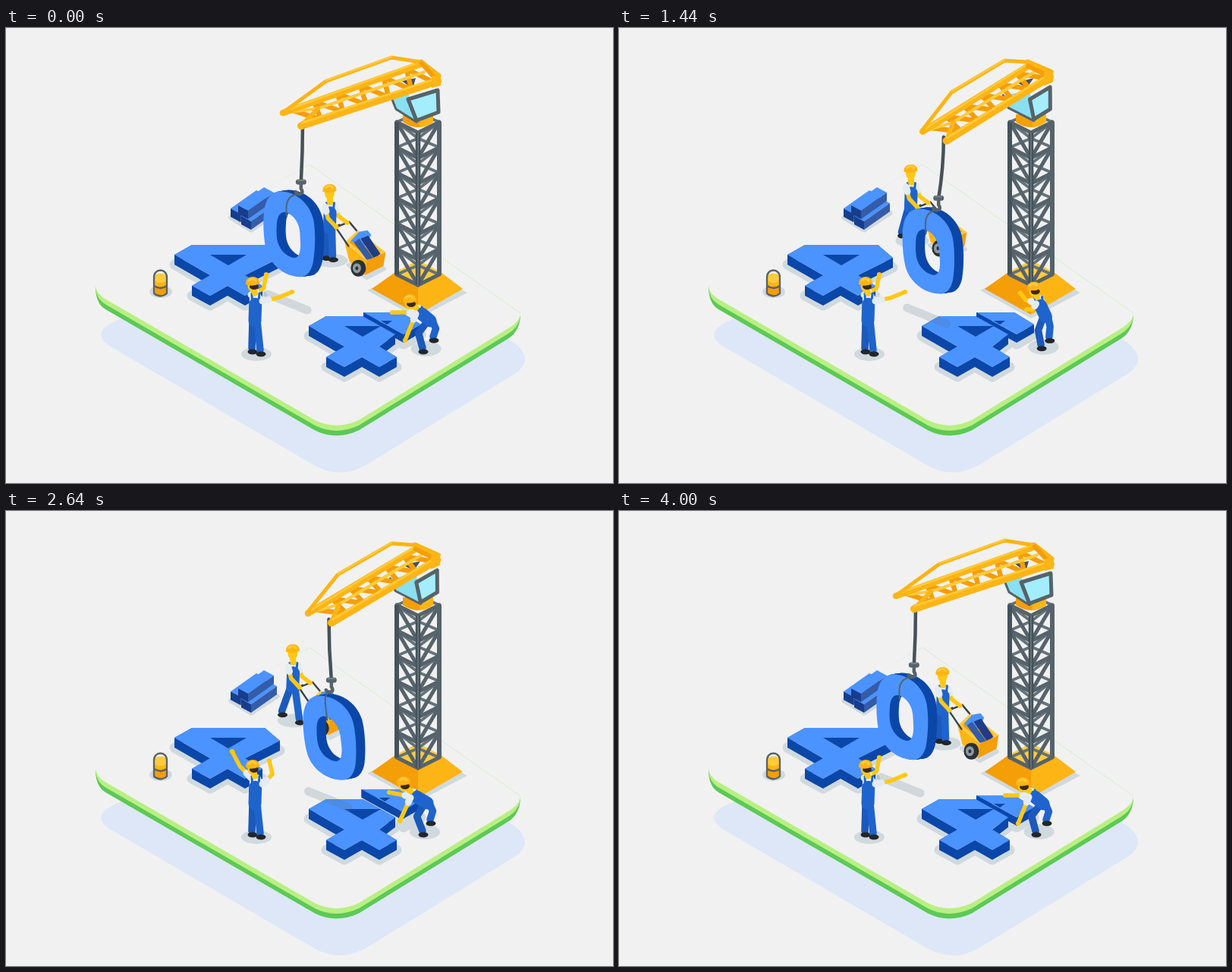
An HTML page for the animation above (4.04 s loop, 800x600 px).

```html
<!DOCTYPE html>
<html lang="en">
<head>
<meta charset="utf-8">
<title>Construction site</title>
<style>
html, body { margin: 0; width: 100%; height: 100%; overflow: hidden; background: #f1f1f1; }
svg { display: block; width: 100vw; height: 100vh; }
</style>
</head>
<body>
<svg id="stage" viewBox="0 0 800 600" stroke-linejoin="round" stroke-linecap="round"></svg>
<script>
const LOOP = 4040, CYCLE = 4000, TURN = 2 * Math.PI / CYCLE;
const BLUE = '#4b93ff', NAVY = '#0b47a8', DENIM = '#1f64cc', SKIN = '#ffc814', GOLD = '#fdb515',
  AMBER = '#f49e08', SUN = '#ffcb3c', STEEL = '#56636b', DARK = '#45525a', SHADE = '#d0d9de', PAPER = '#f1f1f1';

const lerp = (a, b, k) => a + (b - a) * k;
const mix = (p, q, k) => [lerp(p[0], q[0], k), lerp(p[1], q[1], k)];
const add = (p, q) => [p[0] + q[0], p[1] + q[1]];

// There and back once per cycle; lag makes hanging or pushed things trail the crane.
const swing = (t, lag = 0) => (1 - Math.cos((t - lag) * TURN)) / 2;
function ramp(t, from, to) {
  const u = Math.min(1, Math.max(0, (t - from) / (to - from)));
  return u * u * (3 - 2 * u);
}

// Elbow or knee: the middle of a limb pushed sideways.
function joint(a, b, bend) {
  const dx = b[0] - a[0], dy = b[1] - a[1], len = Math.hypot(dx, dy) || 1;
  return add(mix(a, b, .5), [-dy / len * bend, dx / len * bend]);
}

const poly = (pts, fill, extra = '') => `<polygon points="${pts.map(p => p.join()).join(' ')}" fill="${fill}" ${extra}/>`;
const line = (pts, color, w, extra = '') =>
  `<polyline points="${pts.map(p => p.join()).join(' ')}" fill="none" stroke="${color}" stroke-width="${w}" ${extra}/>`;
const path = (d, fill, extra = '') => `<path d="${d}" fill="${fill}" ${extra}/>`;
const curve = (d, color, w) => path(d, 'none', `stroke="${color}" stroke-width="${w}"`);
const oval = ([x, y], rx, ry, fill) => `<ellipse cx="${x}" cy="${y}" rx="${rx}" ry="${ry}" fill="${fill}"/>`;
const group = (transform, body) => `<g transform="${transform}">${body}</g>`;

function slab(pts, depth) {
  const sides = pts.map((a, i) => {
    const b = pts[(i + 1) % pts.length];
    return poly([a, b, add(b, [0, depth]), add(a, [0, depth])], NAVY);
  });
  return sides.join('') + poly(pts, BLUE);
}
const slabShadow = pts => poly(pts.map(p => add(p, [0, 13])), SHADE, `stroke="${SHADE}" stroke-width="13"`);

function ground() {
  const plate = (drop, fill) => path(
    `M118 ${338 + drop / 4}Q118 ${350 + drop} 132 ${358 + drop}L407 ${517 + drop}Q435 ${531 + drop} 465 ${517 + drop}`
    + `L662 ${396 + drop}Q678 ${386 + drop} 678 376L400 180Z`, fill);
  return path('M150 384Q109 400 136 419L405 576Q440 596 475 576L672 455Q697 437 670 415L400 260Z', '#dde7f7')
    + plate(13.5, '#5cc956') + plate(7, '#b9ef83') + plate(0, PAPER);
}

// Shared outline of the digit 4 without its upper right arm.
const FOOT = [[492, 420], [515, 434], [492, 447], [469, 434], [446, 447], [422, 434], [446, 420], [399, 393], [422, 380]];
const CUT_FOUR = [[470, 380], [513, 404], ...FOOT];
const FOUR = [[518, 380], [538, 397], ...FOOT];
const HOLE = [[446, 393], [494, 393], [470, 407]];
const PIECE = [[471, 375], [521, 375], [547, 391], [524, 404]];

function planks() {
  const bar = (x, y) => group(`translate(${x} ${y})`,
    poly([[0, 0], [34, -24], [47, -17], [13, 7]], BLUE)
    + poly([[0, 0], [13, 7], [13, 18], [0, 11]], '#173d8c')
    + poly([[13, 7], [47, -17], [47, -6], [13, 18]], '#345ca9'));
  return poly([[297, 250], [323, 266], [357, 244], [325, 232]], SHADE, `stroke="${SHADE}" stroke-width="7"`)
    + bar(296, 238) + bar(310, 248) + bar(306, 234);
}

function bucket() {
  return oval([204, 348], 15, 8, SHADE)
    + path('M194 330L195 350Q204 357 212 350L213 330Z', AMBER)
    + oval([203.5, 330], 9.5, 6.5, SUN) + path('M194 331Q203 342 213 331V337Q203 345 194 337Z', GOLD)
    + curve('M195 340Q204 346 212 340M195 350Q204 357 212 350M195 350V330C194 316 213 316 212 330V350', STEEL, 2.3);
}

function craneTower() {
  const left = [515, 124], front = [543, 138], right = [571, 124], back = [543, 112], step = 33.5;
  const down = (p, i) => add(p, [0, i * step]);
  const lattice = (middle, color, w) => {
    let out = '';
    for (let i = 0; i <= 6; i++) {
      out += line([down(left, i), down(middle, i), down(right, i)], color, w);
      if (i < 6) out += line([down(left, i), down(middle, i + 1), down(right, i)], color, w);
    }
    return out;
  };
  const column = (p, color, w) => line([p, down(p, 6)], color, w, 'stroke-linecap="butt"');
  return poly([[476, 346], [543, 383], [608, 349], [540, 314]], SHADE)
    + poly([[482, 344], [513, 322], [543, 340], [543, 378]], AMBER)
    + poly([[602, 344], [573, 322], [543, 340], [543, 378]], GOLD)
    + poly([[513, 322], [543, 306], [573, 322], [543, 340]], SUN)
    + lattice(back, '#65737b', 4) + lattice(front, STEEL, 5)
    + column(left, DARK, 6) + column(right, STEEL, 6) + column(front, DARK, 6.5) + column(front, '#6d7a82', 1.5)
    + path('M523 114H563V124Q543 138 523 124Z', AMBER) + path('M545 114H563V124Q555 130 545 131Z', GOLD);
}

function craneArm(k) {
  const P = (ax, ay, bx, by) => [lerp(ax, bx, k), lerp(ay, by, k)];
  const side = [P(508, 92, 506, 88), P(530, 86, 544, 82), P(541, 124, 548, 122), P(514, 107, 513, 105)];
  const glass = [P(530, 94, 544, 94), P(569, 82, 568, 77), P(570, 111, 568, 106), P(541, 122, 548, 120)];
  const l0 = P(365, 112, 408, 142), l1 = P(548, 47, 537, 51);
  const f0 = P(389, 129, 441, 153), f1 = P(569, 70, 568, 63);
  const at = (u, v) => mix(mix(l0, l1, u), mix(f0, f1, u), v);
  const braces = Array.from({ length: 12 }, (_, i) => at(.06 + i * .083, i % 2));
  const rail = [P(367, 110, 407, 140), P(422, 70, 442, 88), P(508, 39, 508, 44), P(547, 45, 537, 45)];
  return poly(side, '#8adff1') + line([side[0], side[3], side[2]], STEEL, 3)
    + poly(glass, '#a3edfd', `stroke="${STEEL}" stroke-width="5"`)
    + poly([P(522, 70, 524, 72), P(540, 66, 548, 66), P(536, 80, 538, 78)], DARK)
    + line(braces, AMBER, 6.5)
    + line([at(.05, .1), at(.2, .4), at(.97, .4)], SUN, 4) + line([at(.2, .4), at(0, 1)], GOLD, 6)
    + line([l0, l1], GOLD, 8.5) + line([add(l0, [2, -3]), add(l1, [0, -3])], SUN, 2.5)
    + line(rail, GOLD, 5) + line(rail.slice(1, 3).map(p => add(p, [0, -1])), SUN, 2)
    + line([rail[3], P(570, 63, 569, 57)], GOLD, 7) + line([l1, f1], AMBER, 6)
    + line([f0, f1], GOLD, 10) + line([add(f0, [1, -4]), add(f1, [0, -4])], SUN, 2.5)
    + poly([P(561, 63, 560, 57), P(573, 62, 572, 55), P(573, 76, 572, 70), P(561, 79, 560, 76)], GOLD);
}

const RING = 'M392 280C392 262 398 250 411 248C434 247 452 263 458 283C462 300 463 322 461 340C459 352 453 359 445 359'
  + 'C425 360 405 346 398 326C394 312 392 295 392 280Z'
  + 'M410 291C410 280 414 275 420 275C432 278 439 288 441 300C443 315 444 322 442 329C440 335 436 335 432 334C422 331 415 323 412 313C410 304 410 298 410 291Z';

function zero(t, hook) {
  const x = lerp(335, 396, swing(t, 290)), y = lerp(327, 359, swing(t, 150));
  const tilt = lerp(4.5, 0, swing(t, 500));
  let body = '';
  for (let i = 8; i > 0; i--) body += group(`translate(${i * 1.5} ${-i * .3})`, path(RING, NAVY, 'fill-rule="evenodd"'));
  body += path(RING, BLUE, 'fill-rule="evenodd"');
  const [hx, hy] = hook, ex = x + 32, ey = y - 79;
  return group(`translate(${x - 392} ${y - 359}) rotate(${tilt} 432 303)`, body)
    + curve(`M${hx - 1} ${hy + 14}C${hx - 10} ${hy + 18} ${ex - 4} ${ey - 28} ${ex} ${ey}`, STEEL, 2);
}

function zeroShadow(t) {
  const x = lerp(342, 403, swing(t, 290)), y = lerp(351, 374, swing(t, 60));
  return line([[x, y], [x + 52, y + 21]], 'rgba(80,110,130,.2)', 11);
}

function rope(k, [hx, hy]) {
  const [x, y] = mix([391, 125], [436, 148], k);
  return curve(`M${x} ${y}Q${x} ${(y + hy) / 2} ${hx} ${hy}`, DARK, 4.5)
    + curve(`M${hx} ${hy + 2}V${hy + 9}Q${hx + 4} ${hy + 15} ${hx - 2} ${hy + 16}Q${hx - 6} ${hy + 16} ${hx - 7} ${hy + 13}`, STEEL, 4.5)
    + line([[hx - 3.5, hy], [hx + 3.5, hy]], STEEL, 7) + line([[hx - 4, hy - 2], [hx + 4, hy - 2]], '#75828a', 2);
}

function arm([shoulder, hand, bend]) {
  const elbow = joint(shoulder, hand, bend);
  return line([shoulder, elbow, hand], SKIN, 5.5) + line([shoulder, mix(shoulder, elbow, .4)], '#e4ebf2', 9)
    + oval(hand, 3.2, 2.8, SKIN);
}

function worker({ head, shoulder, hip, feet, bends = [0, 0], arms, hair = true }) {
  const [hx, hy] = head, chest = mix(shoulder, hip, .3);
  const leg = i => {
    const top = add(hip, [i ? 3 : -3, 0]), ankle = add(feet[i], [0, -5]);
    return line([top, joint(top, ankle, bends[i]), ankle], i ? DENIM : '#1b59bb', 9.5)
      + oval(add(feet[i], [1, 0]), 6.5, 3.4, '#22262b');
  };
  const strap = x => line([add(shoulder, [x, -5]), add(chest, [x * .8, 0])], DENIM, 3);
  return arm(arms[0]) + leg(0) + leg(1)
    + line([shoulder, chest], '#e9eff5', 16) + line([chest, hip], DENIM, 17) + strap(-5) + strap(5)
    + line([[hx, hy + 6], mix(head, shoulder, .75)], SKIN, 8)
    + oval([hx, hy + 6], 6.5, 8, SKIN)
    + (hair ? oval([hx + 2, hy + 7], 6, 4, '#3a2a1c') : '')
    + path(`M${hx - 9} ${hy + 4}C${hx - 10} ${hy - 9} ${hx + 10} ${hy - 9} ${hx + 9} ${hy + 3}Q${hx} ${hy + 8} ${hx - 9} ${hy + 4}Z`, GOLD)
    + curve(`M${hx - 5} ${hy - 1}Q${hx} ${hy - 6} ${hx + 4} ${hy - 1}`, SUN, 3)
    + arm(arms[1]);
}

function director(t) {
  const back = ramp(t, 3350, 3900);
  const wave = ramp(t, 1600, 2300) - back, fold = ramp(t, 1480, 1930) - back;
  const raised = add(mix([343, 325], [298, 317], wave), [0, -11 * Math.sin(Math.PI * wave)]);
  const pointing = mix([377, 348], [347, 329], fold);
  return oval([330, 430], 20, 9, SHADE) + worker({
    head: [325, 334], shoulder: [329, 355], hip: [328, 386], feet: [[324, 427], [335, 430]],
    arms: [[[323, 352], raised, lerp(8, -3, wave)], [[338, 360], pointing, lerp(2, 9, fold)]]
  });
}

function lifter(rise, lift) {
  const pose = (crouch, stand, heave) => mix(mix(crouch, stand, rise), heave, lift);
  const shoulder = pose([543, 373], [563, 345], [536, 374]);
  const feet = [pose([549, 427], [564, 418], [549, 427]), pose([563, 412], [571, 413], [559, 412])];
  const reach = pose([509, 375], [551, 321], [505, 371]);
  const grip = pose([526, 412], [550, 326], [519, 409]);
  return oval(add(mix(feet[0], feet[1], .4), [-1, 2]), 20, 10, SHADE) + worker({
    head: pose([532, 357], [563, 322], [524, 356]), shoulder, hip: pose([559, 386], [566, 374], [555, 385]), feet,
    bends: [lerp(9, 1, rise), lerp(-4, 0, rise)],
    arms: [[add(shoulder, [-5, 2]), reach, -8 * rise], [add(shoulder, [-3, 4]), grip, -8 * rise]]
  });
}

function cart(loaded) {
  const load = poly([[455, 281], [466, 269], [477, 267], [482, 273], [472, 290]], BLUE)
    + poly([[459, 283], [466, 278], [485, 304], [476, 306]], '#345ca9')
    + poly([[468, 278], [478, 274], [494, 298], [486, 305]], '#203c86');
  return poly([[452, 313], [476, 330], [499, 318], [478, 303]], SHADE, `stroke="${SHADE}" stroke-width="5"`)
    + line([[468, 274], [453, 256], [438, 262]], '#3b4248', 2.4)
    + poly([[447, 283], [464, 267], [501, 296], [476, 307]], SUN)
    + poly([[453, 283], [464, 272], [495, 295], [477, 302]], AMBER)
    + poly([[464, 272], [495, 295], [487, 298], [463, 281]], GOLD)
    + (loaded ? load : '')
    + poly([[447, 283], [476, 307], [474, 326], [453, 308]], GOLD)
    + poly([[476, 307], [501, 296], [498, 314], [474, 326]], AMBER)
    + line([[452, 288], [435, 263], [440, 260]], '#3b4248', 2.4)
    + oval([465, 317], 10, 11, '#2c3136') + oval([463, 317], 5.5, 6.5, '#8d989f') + oval([463, 317], 2, 2.5, '#2c3136');
}

function hauler(t) {
  const stride = 11 * Math.abs(Math.sin(t * TURN)) * Math.cos((t - 2640) * TURN * 7);
  const person = worker({
    head: [427, 212], shoulder: [428, 236], hip: [427, 263], hair: false,
    feet: [[422 - stride, 304 - stride / 2], [431 + stride / 2, 306 + stride * .4]],
    arms: [[[434, 235], [450, 257], 4], [[421, 236], [436, 263], 4]]
  });
  return group(`translate(${mix([0, 0], [-58, -36], swing(t, 130))})`,
    oval([429, 307], 22, 9, SHADE) + cart(t < 300 || t > 2100) + person);
}

const fixedBack = ground() + planks() + bucket()
  + group('translate(-177 -94)', slabShadow(FOUR) + slab(FOUR, 13) + poly(HOLE, NAVY))
  + slabShadow(CUT_FOUR) + slabShadow(PIECE) + craneTower();
const rightFour = slab(CUT_FOUR, 13) + poly(HOLE, NAVY);
const loosePiece = slab(PIECE, 11) + poly([[494, 386], [509, 386], [502, 391]], NAVY);

const stage = document.getElementById('stage');
stage.innerHTML = `<g>${fixedBack}</g><g></g>`;
const moving = stage.lastElementChild;

function draw(time) {
  const t = Math.min(time % LOOP, CYCLE);
  const k = swing(t);
  const hook = [lerp(388, 435, swing(t, 170)), lerp(203, 229, k)];
  const rise = t < 1900 ? Math.sin(Math.PI * t / 1900) ** 2 : 0;
  const lift = ramp(t, 2000, 2550) - ramp(t, 3250, 3950);
  moving.innerHTML = group(`translate(${-2.5 * lift} ${-8 * lift})`, loosePiece) + rightFour
    + hauler(t) + zeroShadow(t) + zero(t, hook) + rope(k, hook) + craneArm(k)
    + director(t) + lifter(rise, lift);
}

const start = performance.now();
function tick() {
  draw(performance.now() - start);
  requestAnimationFrame(tick);
}
tick();
</script>
</body>
</html>
```
